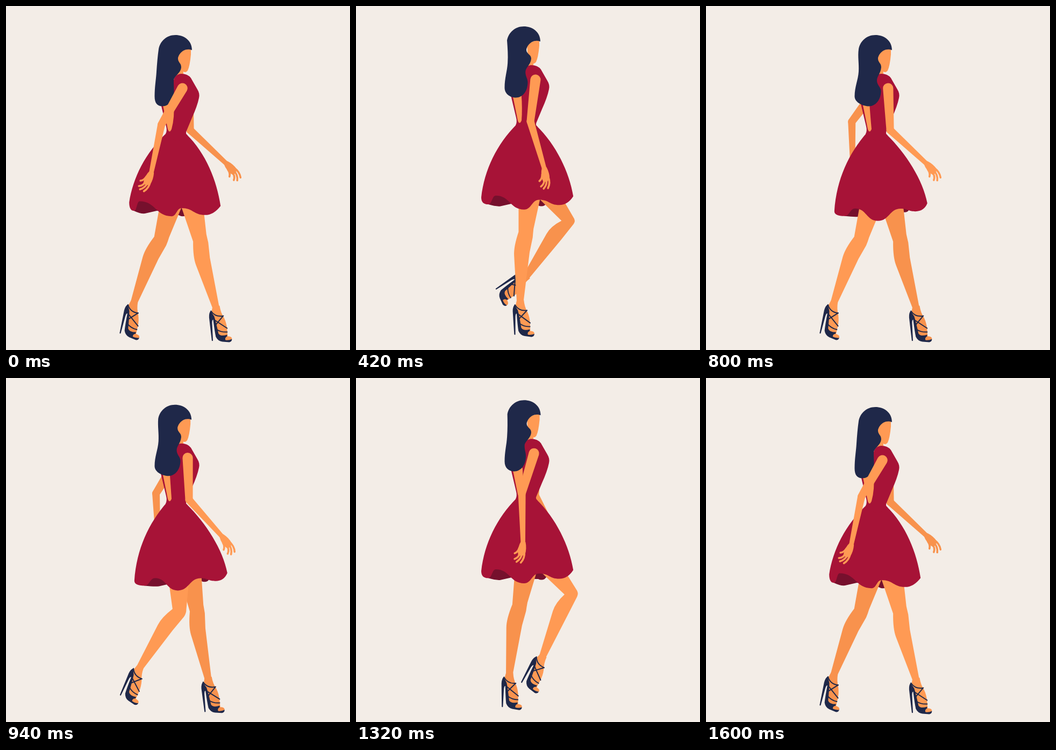
Write an HTML page with a canvas that moves like this. It is 640 px wide and 640 px high and loops after 1.64 s.

```html
<!DOCTYPE html>
<html lang="en">
<head>
<meta charset="utf-8">
<title>Walk cycle</title>
<style>
  html, body { margin: 0; width: 100%; height: 100%; overflow: hidden; background: #f3ede7; }
  canvas { display: block; width: 640px; height: 640px; }
</style>
</head>
<body>
<canvas id="stage" width="640" height="640"></canvas>
<script>
const ctx = document.getElementById('stage').getContext('2d');
const PAPER = '#f3ede7', NAVY = '#1f2849', RED = '#a71337', WINE = '#76102d';
const SKIN = '#ff9a54', SHADE = '#f8924d';
const CYCLE = 1600, LOOP = 1640, STEP = 20;
const TAU = Math.PI * 2, RAD = Math.PI / 180;

// phase in ms, then thigh, shin and foot angles in degrees
const GAIT = [
  [0, 12.5, 13.2, 0],
  [140, 10, 9.3, -1],
  [200, 5.9, 6.8, -1],
  [420, -6.2, -4.6, 3],
  [520, -10.6, -8.3, 6],
  [660, -15.8, -17.3, 16],
  [800, -16.4, -23, 18],
  [940, 1, -35, 29],
  [1000, 9.9, -39, 37],
  [1220, 37.3, -37.3, 61],
  [1320, 38.7, -24.8, 33],
  [1460, 34.5, -9, 12]
];

const mod = (a, n) => ((a % n) + n) % n;
const lerp = (a, b, u) => a + (b - a) * u;
const down = a => [Math.sin(a * RAD), Math.cos(a * RAD)];
const front = a => [Math.cos(a * RAD), -Math.sin(a * RAD)];
const move = (p, d, k) => [p[0] + d[0] * k, p[1] + d[1] * k];

function key(i) {
  const n = GAIT.length, k = GAIT[mod(i, n)];
  return [k[0] + Math.floor(i / n) * CYCLE, ...k.slice(1)];
}

// Periodic cubic Hermite through the gait keys
function gait(phase) {
  let i = GAIT.length - 1;
  while (GAIT[i][0] > phase) i--;
  const [a, b, c, d] = [key(i - 1), key(i), key(i + 1), key(i + 2)];
  const h = c[0] - b[0], u = (phase - b[0]) / h, v = 1 - u;
  return [1, 2, 3].map(j => {
    const m0 = (c[j] - a[j]) / (c[0] - a[0]) * h;
    const m1 = (d[j] - b[j]) / (d[0] - b[0]) * h;
    return v * v * (1 + 2 * u) * b[j] + u * v * v * m0
      + u * u * (3 - 2 * u) * c[j] - u * u * v * m1;
  });
}

function fill(path, color) {
  ctx.fillStyle = color;
  ctx.fill(new Path2D(path));
}

function line(path, color, width) {
  ctx.strokeStyle = color;
  ctx.lineWidth = width;
  ctx.stroke(new Path2D(path));
}

function taper(p, q, r0, r1, color) {
  const a = Math.atan2(q[1] - p[1], q[0] - p[0]);
  ctx.fillStyle = color;
  ctx.beginPath();
  ctx.arc(p[0], p[1], r0, a + Math.PI / 2, a - Math.PI / 2);
  ctx.arc(q[0], q[1], r1, a - Math.PI / 2, a + Math.PI / 2);
  ctx.fill();
}

function at(p, degrees, draw) {
  ctx.save();
  ctx.translate(p[0], p[1]);
  ctx.rotate(degrees * RAD);
  draw();
  ctx.restore();
}

function foot(color) {
  fill('M-6,-3 L7,-4 Q9,9 15,18 Q20,28 21,40 L22,53 Q30,53 30,58 Q24,62 14,60 L3,55 Q1,25 -8,8 Z', color);
  fill('M-9,5 Q-13,9 -12.5,18 L-7.5,61 Q-6.3,62.5 -5.3,61 L-7,28 Q-7,22 -5,22 Q-2,45 0,54 Q4,62 12,63 '
    + 'L25,64 Q30,63 30,58 Q24,61 18,60 Q16,56 21,53 L21,50 Q9,54 5,48 Q0,25 -3,16 Q-7,11 -9,5 Z', NAVY);
  line('M-9,6 Q-1,18 14,15 M13,16 L-2,34 M-2,23 L21,38 M1,40 Q10,46 21,45', NAVY, 2);
}

function leg(phase, bob, color) {
  const [thigh, shin, tilt] = gait(phase);
  const hip = [328 + 9 * Math.cos(phase / CYCLE * TAU), 320 + bob];
  const d1 = down(thigh), n1 = front(thigh), d2 = down(shin), n2 = front(shin);
  const nk = front((thigh + shin) / 2);
  const knee = move(hip, d1, 110), ankle = move(knee, d2, 129.5);
  const kneeFront = move(knee, nk, 14), kneeBack = move(knee, nk, -13);
  const calfFront = move(move(knee, d2, 36), n2, 10.5);
  const calfBack = move(move(knee, d2, 28), n2, -20);

  ctx.fillStyle = color;
  ctx.beginPath();
  ctx.moveTo(...move(hip, n1, 25));
  ctx.lineTo(...move(kneeFront, d1, -8));
  ctx.quadraticCurveTo(...kneeFront, ...move(kneeFront, d2, 8));
  ctx.lineTo(...calfFront);
  ctx.lineTo(...move(ankle, n2, 6.5));
  ctx.lineTo(...move(ankle, n2, -6));
  ctx.lineTo(...move(move(calfBack, d2, 16), n2, 2.2));
  ctx.quadraticCurveTo(...calfBack, ...kneeBack);
  ctx.lineTo(...move(hip, n1, -25));
  ctx.fill();
  taper(ankle, move(ankle, d2, 1), 6.2, 6.2, color);
  at(ankle, tilt, () => foot(color));
}

function hand(color) {
  fill('M-4.2,-3 L4,-3 Q10,8 10,19 Q5,26 -2,24 Q-8,12 -4.2,-3 Z', color);
  line('M7,14 Q12,26 7,36 M4,18 Q6,29 -1,37 M0,18 Q1,28 -6,33 M-4,11 Q-4,19 -9,23', color, 3.6);
}

// swing: 1 is fully back, -1 fully forward
function arm(swing, bob, color, isFar) {
  const extra = isFar ? Math.max(0, swing) : 0;
  const upper = -8.2 - 16.4 * swing - 5.4 * swing * swing - 7 * extra;
  const lower = 14 - 29.6 * swing + 3.7 * swing * swing + 13 * extra;
  const shoulder = [333.5 - 5.3 * swing - 10 * extra, 145 + bob];
  const elbow = move(shoulder, down(upper), 78);
  const wrist = move(elbow, down(lower), 92);
  taper(shoulder, elbow, 9.6, 7, color);
  taper(elbow, wrist, 7, 4.2, color);
  at(wrist, 17 + 4 * swing - lower, () => hand(color));
}

function skirtPoints(u) {
  const p = (x0, y0, x1, y1) => [lerp(x0, x1, u), lerp(y0, y1, u)];
  return {
    hipBack: p(259, 265, 266, 266),
    sideBack: p(236, 312, 243, 314),
    corner: p(229, 357, 239, 374),
    low: p(238, 373, 258, 383),
    fold: p(248, 355, 278, 369),
    lining: p(258, 379, 285, 385),
    lobe: p(308, 383, 320, 392),
    crest: p(326, 368, 363, 369),
    slit: p(328, 384, 370, 376),
    trough: p(370, 381, 390, 374),
    tip: p(399, 364, 412, 359),
    sideFront: p(392, 317, 404, 316)
  };
}

function wave(from, to) {
  const mid = (from[0] + to[0]) / 2;
  return `C${mid},${from[1]} ${mid},${to[1]} ${to} `;
}

function lining(k) {
  const [lx, ly] = k.lining, [sx, sy] = k.slit;
  fill(`M${k.low[0] - 3},${k.fold[1]} L${k.low} Q${lx - 8},${ly} ${lx},${ly - 1} L${lx + 22},${ly - 6} `
    + `L${k.lobe[0]},${k.lobe[1] - 8} L${sx - 6},${sy - 2} Q${sx},${sy + 1} ${sx + 6},${sy - 2} `
    + `L${sx + 15},${sy - 12} L330,340 Z`, WINE);
}

function skirt(k) {
  fill(`M299,228 C${k.hipBack} ${k.sideBack} ${k.corner} Q${k.corner[0]},${k.low[1]} ${k.low} `
    + wave(k.low, k.fold) + wave(k.fold, k.lobe) + wave(k.lobe, k.crest) + wave(k.crest, k.trough)
    + `Q${k.trough[0] + 16},${k.trough[1]} ${k.tip} C${k.sideFront} 372,266 336,231 Z`, RED);
}

function torso(swing) {
  const edge = 309 + 4 * swing;
  fill('M311,134 Q313,119 326,118 Q338,118 344,126 L356,147 Q361,155 359,163 Q356,178 346,200 '
    + 'L336,224 Q333,229 338,233 L318,245 L297,230 Q300,224 298,216 L288,174 L300,150 Z', RED);
  fill(`M291,172 L${edge - 1},172 Q${edge + 1},200 308,221 Q304,230 301,221 Z`, SKIN);
}

function head(bob, swing) {
  const tip = 344.5 + bob * 0.19, x = tip - 346;
  const waist = 282 - 2 * swing, lobe = 319 - 6.5 * swing;
  const dent = 315 - 3 * swing, base = 297 - 6 * swing;
  fill(`M318,100 L330,108 L330,119 L312,128 Z`, SKIN);
  fill(`M${x + 344},70 L${x + 344},82 Q${x + 342},104 ${x + 338},112 Q${x + 334},118 ${x + 329},113 `
    + `L320,106 L318,78 Z`, SKIN);
  return () => fill(`M${tip},74 C${tip},56 ${x + 331},46 ${x + 315},46 C${x + 299},46 ${x + 287},57 ${x + 284},72 `
    + `C282,86 ${waist + 1},100 ${waist},114 C${waist - 1},130 276.5,142 276.5,160 `
    + `C276.5,172 ${base - 10},178.5 ${base},178.5 C${base + 13},178.5 ${lobe},166 ${lobe},150 `
    + `C${lobe},143 ${dent},139 ${dent},131 C${dent},122 325,118 326,106 `
    + `C326,98 ${x + 320},97 ${x + 320},90 C${x + 320},84 ${x + 329},68 ${tip},74 Z`, NAVY);
}

function draw(t) {
  const swing = Math.cos(t / CYCLE * TAU);
  const bob = 8 * Math.cos(2 * t / CYCLE * TAU);
  const sway = -Math.cos((t - 70) / CYCLE * TAU);
  const hem = skirtPoints((sway + 1) / 2);
  const raised = paint => at([0, bob], 0, paint);

  ctx.fillStyle = PAPER;
  ctx.fillRect(0, 0, 640, 640);
  ctx.lineCap = ctx.lineJoin = 'round';

  arm(-swing, bob, SHADE, true);
  raised(() => lining(hem));
  leg(mod(t + CYCLE / 2, CYCLE), bob, SHADE);
  leg(mod(t, CYCLE), bob, SKIN);
  raised(() => {
    skirt(hem);
    const hair = head(bob, swing);
    torso(swing);
    hair();
  });
  arm(swing, bob, SKIN, false);
}

function tick(now) {
  draw(Math.min(Math.floor((now % LOOP) / STEP) * STEP, CYCLE));
  requestAnimationFrame(tick);
}
draw(0);
requestAnimationFrame(tick);
</script>
</body>
</html>
```
